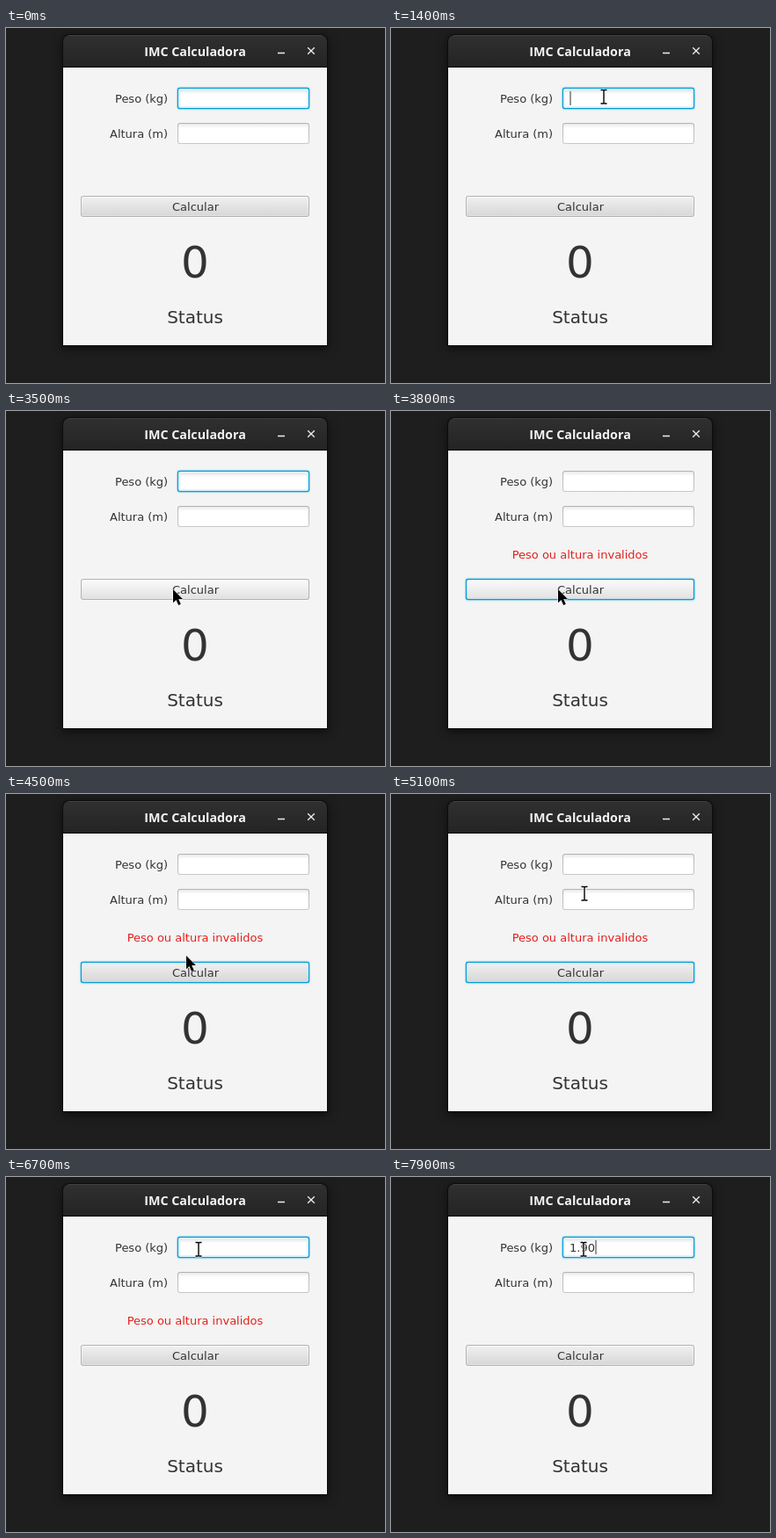
These frames come from a looping animation (431x404 px, 8000 ms). An HTML page:

```html
<!DOCTYPE html>
<html lang="pt">
<head>
<meta charset="utf-8">
<title>IMC Calculadora</title>
<style>
html, body { margin: 0; width: 100%; height: 100%; overflow: hidden; background: #1e1e1e; }
svg { display: block; width: 431px; height: 404px; }
text { font: 13px "DejaVu Sans", sans-serif; fill: #333; }
.title { font: bold 14.3px "Open Sans", "Noto Sans", sans-serif; fill: #f2f2f2; }
.value { font-size: 50px; }
.status { font-size: 20px; }
.error { fill: #e3201b; }
.mid { text-anchor: middle; }
.shadow { filter: drop-shadow(0 3px 6px rgba(0, 0, 0, .6)); }

/* 8 s loop: 1.25% is 100 ms, every change is a hard step */
.anim { animation: 8s step-end infinite; }
.caret { animation-name: caret; }
.field-focus { animation-name: field-focus; }
.button-focus { animation-name: button-focus; }
.hover { animation-name: hover; }
.armed { animation-name: armed; }
.error { animation-name: error; }
.cursor { animation-name: move; }
.arrow { animation-name: arrow; }
.beam { animation-name: beam; }
.key1 { animation-name: key1; }
.key2 { animation-name: key2; }
.key3 { animation-name: key3; }
.key4 { animation-name: key4; }

@keyframes key1 { 0% { fill-opacity: 0 } 88.75%, 100% { fill-opacity: 1 } }
@keyframes key2 { 0% { fill-opacity: 0 } 91.25%, 100% { fill-opacity: 1 } }
@keyframes key3 { 0% { fill-opacity: 0 } 96.25%, 100% { fill-opacity: 1 } }
@keyframes key4 { 0% { fill-opacity: 0 } 98.75%, 100% { fill-opacity: 1 } }

@keyframes caret {
  0%, 8.75%, 21.25%, 30%, 42.5%, 70%, 83.75% { opacity: 0 }
  2.5%, 15%, 23.75%, 36.25%, 65%, 77.5% { opacity: 1 }
  0% { transform: translateX(0) }
  88.75% { opacity: 1; transform: translateX(8.3px) }
  91.25% { transform: translateX(12.4px) }
  96.25% { transform: translateX(20.7px) }
  98.75%, 100% { opacity: 1; transform: translateX(29px) }
}
@keyframes field-focus { 0%, 65%, 100% { opacity: 1 } 46.25% { opacity: 0 } }
@keyframes button-focus { 0%, 65%, 100% { opacity: 0 } 46.25% { opacity: 1 } }
@keyframes hover { 0%, 40%, 56.25%, 100% { opacity: 0 } 38.75%, 42.5% { opacity: 1 } }
@keyframes armed { 0%, 47.5%, 100% { opacity: 0 } 46.25% { opacity: 1 } }
@keyframes error { 0%, 88.75%, 100% { opacity: 0 } 47.5% { opacity: 1 } }
@keyframes arrow { 0%, 12.5%, 16.25%, 62.5%, 100% { opacity: 0 } 7.5%, 13.75%, 27.5% { opacity: 1 } }
@keyframes beam { 0%, 13.75%, 27.5% { opacity: 0 } 12.5%, 16.25%, 62.5%, 100% { opacity: 1 } }
@keyframes move {
  0%, 7.5% { transform: translate(51px, 151px) }
  8.75% { transform: translate(80px, 148px) }
  10% { transform: translate(118px, 140px) }
  11.25% { transform: translate(158px, 129px) }
  12.5% { transform: translate(195px, 117px) }
  13.75% { transform: translate(224px, 104px) }
  15% { transform: translate(242px, 93px) }
  16.25% { transform: translate(248px, 84px) }
  17.5% { transform: translate(242px, 78px) }
  21.25% { transform: translate(241px, 77px) }
  23.75% { transform: translate(240px, 80px) }
  25% { transform: translate(238px, 90px) }
  26.25% { transform: translate(237px, 120px) }
  27.5% { transform: translate(237px, 146px) }
  28.75% { transform: translate(235px, 166px) }
  30% { transform: translate(233px, 182px) }
  31.25% { transform: translate(231px, 190px) }
  38.75% { transform: translate(230px, 200px) }
  40% { transform: translate(222px, 220px) }
  41.25% { transform: translate(200px, 223px) }
  42.5% { transform: translate(184px, 212px) }
  43.75% { transform: translate(190px, 203px) }
  53.75% { transform: translate(192px, 201px) }
  55% { transform: translate(198px, 194px) }
  56.25% { transform: translate(205px, 184px) }
  57.5% { transform: translate(210px, 173px) }
  58.75% { transform: translate(213px, 166px) }
  61.25% { transform: translate(216px, 150px) }
  62.5% { transform: translate(219px, 130px) }
  63.75% { transform: translate(220px, 113px) }
  65% { transform: translate(218px, 90px) }
  66.25% { transform: translate(216px, 80px) }
  67.5% { transform: translate(214px, 73px) }
  68.75% { transform: translate(213px, 69px) }
  70% { transform: translate(213px, 68px) }
  71.25% { transform: translate(214px, 70px) }
  72.5% { transform: translate(216px, 74px) }
  73.75% { transform: translate(218px, 79px) }
  75%, 100% { transform: translate(219px, 82px) }
}
</style>
</head>
<body>
<svg viewBox="0 0 431 404">
  <defs>
    <linearGradient id="bar" x2="0" y2="1">
      <stop stop-color="#303030"/><stop offset="1" stop-color="#242424"/>
    </linearGradient>
    <linearGradient id="edge" x2="0" y2="1">
      <stop stop-color="#b3b3b3"/><stop offset="1" stop-color="#c8c8c8"/>
    </linearGradient>
    <linearGradient id="inset" x2="0" y2="1">
      <stop stop-color="#e9e9e9"/><stop offset=".23" stop-color="#fff"/>
    </linearGradient>
    <linearGradient id="bevel" x2="0" y2="1">
      <stop stop-color="#fbfbfb"/><stop offset="1" stop-color="#e2e2e2"/>
    </linearGradient>
    <linearGradient id="face" x2="0" y2="1">
      <stop stop-color="#efefef"/><stop offset="1" stop-color="#d8d8d8"/>
    </linearGradient>
    <linearGradient id="lit" x2="0" y2="1">
      <stop stop-color="#fafafa"/><stop offset="1" stop-color="#e2e2e2"/>
    </linearGradient>
    <linearGradient id="down" x2="0" y2="1">
      <stop stop-color="#dedede"/><stop offset="1" stop-color="#cbcbcb"/>
    </linearGradient>
    <g id="field">
      <rect width="150" height="24" rx="3" fill="url(#edge)"/>
      <rect x="1" y="1" width="148" height="22" rx="2" fill="url(#inset)"/>
    </g>
  </defs>

  <rect width="431" height="404" fill="#1e1e1e"/>

  <!-- window -->
  <path class="shadow" d="M64 362V15a8 8 0 0 1 8-8H358a8 8 0 0 1 8 8V362Z" fill="#0c0c0c"/>
  <path d="M65 44V15a7 7 0 0 1 7-7H358a7 7 0 0 1 7 7V44Z" fill="url(#bar)"/>
  <path d="M71 8.5H359" stroke="#414141"/>
  <rect x="65" y="45" width="300" height="316" fill="#f4f4f4"/>
  <text class="title mid" x="215" y="32">IMC Calculadora</text>
  <path d="M309 28.5h8M343.2 22.2l7.6 7.6m0-7.6l-7.6 7.6" stroke="#eee" stroke-width="1.3" fill="none"/>

  <!-- form -->
  <text x="124" y="85">Peso (kg)</text>
  <text x="118" y="125">Altura (m)</text>
  <use href="#field" x="195" y="68"/>
  <use href="#field" x="195" y="108"/>
  <g class="anim field-focus">
    <rect x="194.8" y="67.8" width="150.4" height="24.4" rx="3" fill="#039ed3"/>
    <rect x="196" y="69" width="148" height="22" rx="2" fill="#fff"/>
    <rect x="193.6" y="66.6" width="152.8" height="26.8" rx="4" fill="#039ed3" opacity=".13"/>
    <rect x="198" y="71" width="144" height="18" fill="url(#inset)"/>
  </g>
  <text x="203" y="85"><tspan class="anim key1">1</tspan><tspan class="anim key2">.</tspan><tspan class="anim key3">9</tspan><tspan class="anim key4">0</tspan></text>
  <rect class="anim caret" x="203.5" y="72" width="1" height="16" fill="#333"/>
  <text class="anim error mid" x="215" y="168">Peso ou altura invalidos</text>

  <!-- button -->
  <rect x="85" y="192" width="260" height="24" rx="3" fill="#fff" opacity=".6"/>
  <rect x="85" y="191" width="260" height="24" rx="3" fill="#b2b2b2"/>
  <rect x="86" y="192" width="258" height="22" rx="2" fill="url(#bevel)"/>
  <g class="anim button-focus">
    <rect x="84.8" y="190.8" width="260.4" height="24.4" rx="3" fill="#039ed3"/>
    <rect x="86" y="192" width="258" height="22" rx="2" fill="url(#bevel)"/>
    <rect x="83.6" y="189.6" width="262.8" height="26.8" rx="4" fill="#039ed3" opacity=".13"/>
  </g>
  <rect x="87" y="193" width="256" height="20" rx="1" fill="url(#face)"/>
  <rect class="anim hover" x="87" y="193" width="256" height="20" rx="1" fill="url(#lit)"/>
  <rect class="anim armed" x="87" y="193" width="256" height="20" rx="1" fill="url(#down)"/>
  <text class="mid" x="215.5" y="208">Calcular</text>

  <text class="value mid" x="215" y="284">0</text>
  <text class="status mid" x="215" y="336">Status</text>

  <!-- pointer -->
  <g class="anim cursor">
    <path class="anim arrow" d="M0 0V15.2L3.5 12L6.1 18L8.8 16.8L6.2 11H11Z" fill="#000" stroke="#fff" stroke-width="1" paint-order="stroke"/>
    <g class="anim beam" fill="none">
      <path id="ibeam" d="M-3.5-7.5H-1Q0-7.5 0-6.5Q0-7.5 1-7.5H3.5M0-7V7.5M-3.5 8H-1Q0 8 0 7Q0 8 1 8H3.5" stroke="#fff" stroke-width="3"/>
      <use href="#ibeam" style="display:none"/>
      <path d="M-3.5-7.5H-1Q0-7.5 0-6.5Q0-7.5 1-7.5H3.5M0-7V7.5M-3.5 8H-1Q0 8 0 7Q0 8 1 8H3.5" stroke="#000" stroke-width="1.4"/>
    </g>
  </g>
</svg>
</body>
</html>
```
